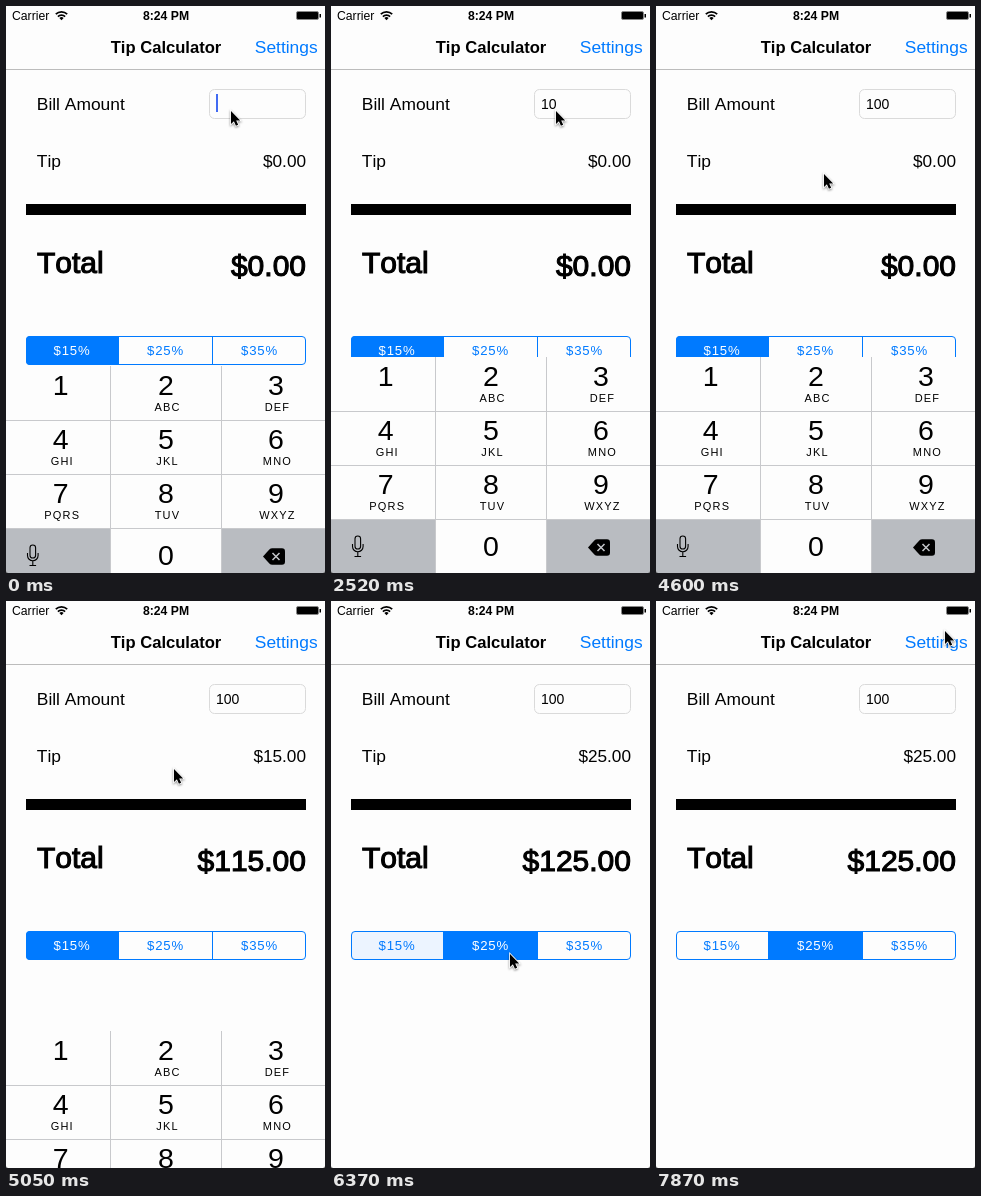
Recreate the animation shown at these times as an HTML page. Size 319 px wide and 567 px high, loop 8 s.

```html
<!DOCTYPE html>
<html lang="en">
<head>
<meta charset="utf-8">
<title>Tip Calculator</title>
<style>
  html, body { margin: 0; height: 100%; overflow: hidden; background: #fdfdfd; }
  svg { display: block; width: 100%; height: 100%; }
  text { font-family: "Liberation Sans", Arial, sans-serif; font-kerning: none; }
  .label { font-size: 17.4px; }
  .big { font-size: 30px; stroke: #000; stroke-width: 1.1px; }
  .bold { font-weight: bold; }
  .mid { text-anchor: middle; }
  .end { text-anchor: end; }
  .seg { font-size: 13.2px; letter-spacing: .8px; }
  .digit { font-size: 28.5px; }
  .letters { font-size: 11px; letter-spacing: 1.2px; }
  #mouse { filter: drop-shadow(0 1px 1.2px rgba(0, 0, 0, .45)); }
</style>
</head>
<body>
<svg viewBox="0 0 319 567">
  <clipPath id="round"><rect x="20" y="330" width="280" height="29" rx="4"/></clipPath>
  <rect width="319" height="567" fill="#fdfdfd"/>

  <text x="6" y="13.5" font-size="12.2">Carrier</text>
  <g fill="none" stroke="#000" stroke-width="1.7">
    <path d="M49.8 8.2a8 8 0 0 1 11.4 0M51.9 10.6a5 5 0 0 1 7.2 0"/>
    <path d="M55.5 14.3l-2.1-2.3a3 3 0 0 1 4.2 0z" fill="#000" stroke="none"/>
  </g>
  <text class="bold mid" x="160" y="13.5" font-size="12.2">8:24 PM</text>
  <rect x="290.5" y="5.5" width="22" height="8" rx="1.5" stroke="#888"/>
  <rect x="313.5" y="8" width="1.5" height="3.5"/>

  <text class="bold mid" x="160" y="47" font-size="16.6">Tip Calculator</text>
  <text class="label" x="248.8" y="47" fill="#007aff">Settings</text>
  <rect y="63" width="319" height="1" fill="#bcbcbc"/>

  <text class="label" x="30.8" y="103.5">Bill Amount</text>
  <rect x="203.5" y="83.5" width="96" height="29" rx="5" fill="#fdfdfd" stroke="#dadada"/>
  <text id="bill" x="210" y="103" font-size="14"></text>
  <rect id="caret" y="88" width="2" height="18" fill="#426bf2"/>
  <text class="label" x="30.8" y="160.5">Tip</text>
  <text id="tip" class="end" x="300" y="160.5" font-size="17.2"></text>
  <rect x="20" y="198" width="280" height="11"/>
  <text class="big" x="31" y="266.5">Total</text>
  <text id="total" class="big end" x="300" y="269.5"></text>

  <g id="segs" clip-path="url(#round)"></g>
  <path d="M112.5 331v28M206.5 331v28" stroke="#007aff"/>
  <rect x="20.5" y="330.5" width="279" height="28" rx="3.5" fill="none" stroke="#007aff"/>

  <g id="keys">
    <rect width="319" height="216" fill="#fdfdfd"/>
    <path d="M0 162h104.5v54H0zM215 162h104v54H215z" fill="#b9bcc1"/>
    <path d="M104.5 0v216M215.5 0v216M0 54.5h319M0 108.5h319M0 162.5h319" stroke="#c8c9cc"/>
    <g fill="none" stroke="#000" stroke-width="1.1">
      <rect x="24" y="179" width="5.6" height="13" rx="2.8"/>
      <path d="M21.5 187v2.5a5.3 5.3 0 0 0 10.6 0v-2.5M26.8 195v4.5M23.5 199.5h6.6"/>
    </g>
    <path d="M257 190.5l6.3-7q1.2-1.2 3-1.2h9.7q3 0 3 3v10.4q0 3-3 3h-9.7q-1.8 0-3-1.2z"/>
    <path d="M266.5 187l7 7m0-7l-7 7" stroke="#c4c6ca" stroke-width="1.5"/>
  </g>

  <path d="M0 564.5q0 2.5 2.5 2.5H0zM319 564.5q0 2.5-2.5 2.5h2.5z" fill="#555"/>
  <g id="mouse">
    <path d="M0 1v13l2.9-2.7 2 4.5 2.3-1-2-4.4h4z" stroke="#fff" stroke-width="1.6" paint-order="stroke"/>
  </g>
</svg>
<script>
const $ = id => document.getElementById(id);
const LOOP = 8000, TICK = 148.2;   // the screen refreshes once per tick
const BLUE = '#007aff', TINT = '#ecf4ff';

// segmented control: [left edge, width, text centre]
$('segs').innerHTML = [[20, 93, 66], [113, 94, 159.5], [207, 93, 253.5]].map(([x, w, mid], i) =>
  `<rect x="${x}" y="330" width="${w}" height="29"/>
   <text class="seg mid" x="${mid}" y="349">$${15 + 10 * i}%</text>`).join('');
const boxes = [...$('segs').querySelectorAll('rect')];
const names = [...$('segs').querySelectorAll('text')];

// number pad
const columns = [54.8, 160, 270];
const letters = ['', 'ABC', 'DEF', 'GHI', 'JKL', 'MNO', 'PQRS', 'TUV', 'WXYZ'];
const digit = (x, y, s) => `<text class="digit mid" x="${x}" y="${y}">${s}</text>`;
$('keys').innerHTML += letters.map((s, i) => {
  const x = columns[i % 3], y = 54 * Math.floor(i / 3);
  return digit(x, y + 29.3, i + 1) + `<text class="letters mid" x="${x + 1.5}" y="${y + 45}">${s}</text>`;
}).join('') + digit(160, 199.3, 0);

// mouse path: tick, x, y
const path = [
  [23, 225, 104], [25, 200, 180], [26, 187, 178], [27, 177, 173], [29, 168, 167],
  [35, 168, 167], [37, 171, 235], [39, 179, 340], [40, 181, 360], [41, 179, 352],
  [47, 179, 352], [49, 242, 347], [50, 242, 347], [51, 252, 285], [52, 277, 110], [53, 289, 29]
];
// caret opacity: from tick, value
const blink = [
  [0, 1], [1, .5], [2, 0], [5, .5], [6, 1], [9, .5], [10, 1], [14, .5], [15, 0], [18, 1],
  [23, .5], [24, 0], [27, .5], [28, 1], [30, .5], [31, 0]
];

const held = (list, n) => list.filter(k => k[0] <= n).pop()[1];

function along(n) {
  if (n <= path[0][0]) return path[0].slice(1);
  const i = path.findIndex(k => k[0] >= n);
  const [a, ax, ay] = path[i - 1], [b, bx, by] = path[i];
  const p = (n - a) / (b - a);
  return [ax + (bx - ax) * p, ay + (by - ay) * p];
}

// critically damped spring, 0 to 1
function spring(ms) {
  const w = Math.max(0, ms) * .0183;
  return 1 - (1 + w) * Math.exp(-w);
}

function draw(n) {
  const t = n * TICK;
  const bill = held([[0, ''], [10, '1'], [17, '10'], [19, '100']], n);
  $('bill').textContent = bill;
  $('caret').setAttribute('x', Math.floor(210 + 7.78 * bill.length));
  $('caret').setAttribute('opacity', held(blink, n));

  const tip = held([[0, 0], [33, 15], [43, 25]], n);
  $('tip').textContent = '$' + tip.toFixed(2);
  $('total').textContent = '$' + (tip && 100 + tip).toFixed(2);

  const chosen = n < 43 ? 0 : 1;
  const faint = n === 42 ? 1 : n === 43 ? 0 : -1;
  boxes.forEach((box, i) => {
    box.setAttribute('fill', i === chosen ? BLUE : i === faint ? TINT : '#fdfdfd');
    names[i].setAttribute('fill', i === chosen ? '#fff' : BLUE);
  });

  const hidden = 1 - spring(t + 271) + spring(t - 4969);
  $('keys').setAttribute('transform', `translate(0 ${Math.round(351 + 216 * hidden)})`);
  $('mouse').setAttribute('transform', `translate(${along(n)})`);
}

const start = performance.now();
function loop() {
  const t = (performance.now() - start) % LOOP;
  draw(Math.min(53, Math.floor((t + 6) / TICK)));
  requestAnimationFrame(loop);
}
loop();
</script>
</body>
</html>
```
